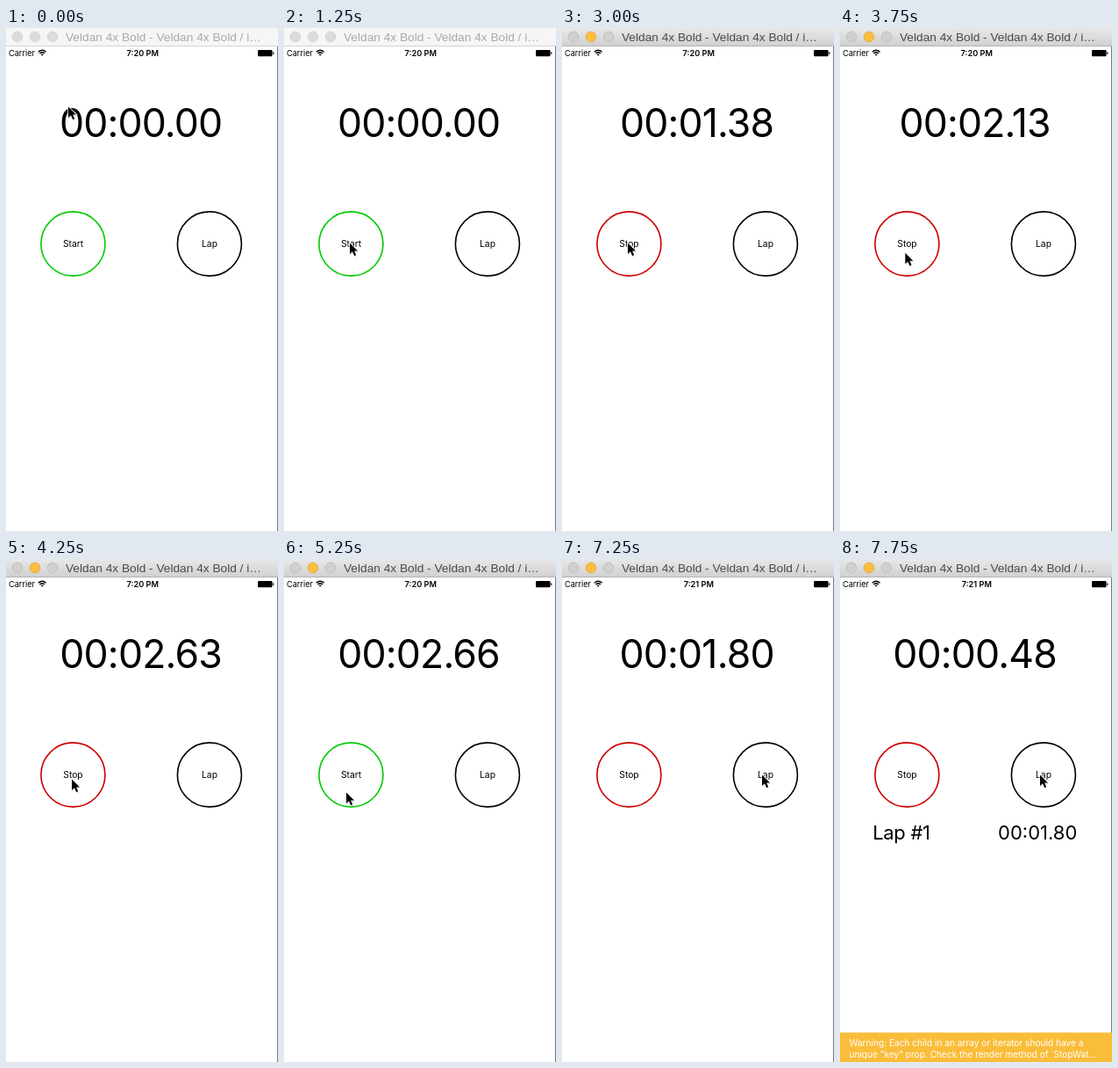
An HTML page that plays this animation: 310 by 572 pixels, repeating every 8000 ms.

```html
<!DOCTYPE html>
<html lang="en">
<head>
<meta charset="utf-8">
<title>Stopwatch</title>
<style>
  html, body { margin: 0; width: 100%; height: 100%; overflow: hidden; background: #fff; }
  svg { display: block; font-family: Inter, Roboto, sans-serif; }
  .mid { text-anchor: middle; }
  .title { font: 13.7px "Liberation Sans", Arial, sans-serif; }
  .status { font-size: 9.2px; }
  .label { font-size: 10.3px; }
  .clock { font-size: 44.5px; letter-spacing: -.8px; }
  .row { font-size: 22px; }
  .warning { font-size: 10.15px; fill: #fff; }
  .ring { fill: none; stroke: #000; stroke-width: 1.6; }
</style>
</head>
<body>
<svg width="310" height="572" viewBox="0 0 310 572">
  <defs>
    <linearGradient id="chrome" x2="0" y2="1">
      <stop stop-color="#e8e8e8"/>
      <stop offset="1" stop-color="#d1d1d1"/>
    </linearGradient>
  </defs>

  <rect id="bar" width="310" height="20"/>
  <rect id="barEdge" y="20" width="310" height="1"/>
  <g stroke-width=".8">
    <circle class="light" cx="13" cy="10" r="5.8"/>
    <circle class="light" cx="33" cy="10" r="5.8"/>
    <circle class="light" cx="53" cy="10" r="5.8"/>
  </g>
  <text id="title" class="title" x="68" y="15">Veldan 4x Bold - Veldan 4x Bold / i…</text>

  <text class="status" x="3" y="32">Carrier</text>
  <g fill="none" stroke="#000" stroke-width="1.4">
    <path d="M36.8 27.2Q41.2 23.2 45.6 27.2M38.5 29.1Q41.2 26.6 43.9 29.1"/>
    <path d="M39.7 30L41.2 31.8 42.7 30Q41.2 28.9 39.7 30Z" fill="#000" stroke="none"/>
  </g>
  <text id="time" class="status mid" x="155.8" y="32" font-weight="600"></text>
  <rect x="287" y="25" width="16.5" height="7.2" rx="1.2"/>
  <rect x="304.2" y="27.3" width="1.2" height="2.6" rx=".6"/>

  <text id="clock" class="clock mid" x="153.6" y="124"></text>
  <circle id="toggleRing" class="ring" cx="76.4" cy="245.4" r="36.5"/>
  <text id="toggle" class="label mid" x="76.5" y="249"></text>
  <circle class="ring" cx="231.9" cy="245.4" r="36.5"/>
  <text class="label mid" x="232" y="249">Lap</text>

  <rect x="309" y="21" width="1" height="551" fill="#777"/>
  <g id="lap">
    <text class="row mid" x="69.9" y="319" letter-spacing="-.3">Lap #1</text>
    <text class="row mid" x="225.2" y="319">00:01.80</text>
    <rect y="538.5" width="310" height="33.5" fill="#fabd3a"/>
    <text class="warning" x="10.4" y="554">Warning: Each child in an array or iterator should have a</text>
    <text class="warning" x="10.4" y="566.5">unique "key" prop. Check the render method of `StopWat…</text>
  </g>

  <g id="cursor">
    <g transform="translate(0 .4) scale(.9)">
      <path d="M0 0V14L3.3 11 5.6 16.3 8 15.3 5.7 10H10Z" transform="translate(.6 1.6)" opacity=".18"/>
      <path d="M0 0V14L3.3 11 5.6 16.3 8 15.3 5.7 10H10Z" stroke="#fff" stroke-width="1.6" paint-order="stroke"/>
    </g>
  </g>
</svg>
<script>
const LOOP = 8000, STEP = 250;
const ACTIVATE = 1500, START = 1608, STOP = 4290, RESTART = 5450, LAP = 7270;

// Pointer path: time, x, y
const path = [
  [0, 71, 89], [500, 84, 140], [1250, 75, 244], [3000, 75, 244], [3500, 74, 258],
  [4250, 75, 250], [5000, 71, 265], [5500, 71, 265], [6250, 112, 259],
  [7000, 228, 245], [LOOP, 228, 245]
];

const $ = id => document.getElementById(id);
const set = (node, attrs) => {
  for (const key in attrs) node.setAttribute(key, attrs[key]);
};
const pad = n => String(n).padStart(2, "0");

function pointerAt(t) {
  const i = path.findIndex(p => p[0] > t);
  const [t0, x0, y0] = path[i - 1], [t1, x1, y1] = path[i];
  const p = (t - t0) / (t1 - t0);
  return [x0 + (x1 - x0) * p, y0 + (y1 - y0) * p];
}

function elapsedAt(t) {
  if (t >= LAP) return t - LAP;
  if (t >= RESTART) return t - RESTART;
  if (t >= STOP) return 2660;
  return Math.max(0, (t - START) * 0.997);
}

function format(ms) {
  const cs = Math.floor(ms / 10);
  return `${pad(Math.floor(cs / 6000))}:${pad(Math.floor(cs / 100) % 60)}.${pad(cs % 100)}`;
}

function draw(t) {
  const active = t >= ACTIVATE;
  const running = t >= START && t < STOP || t >= RESTART;

  set($("bar"), { fill: active ? "url(#chrome)" : "#f6f6f6" });
  set($("barEdge"), { fill: active ? "#b4b4b4" : "#d4d4d4" });
  set($("title"), { fill: active ? "#4a4a4a" : "#a9a9a9" });
  document.querySelectorAll(".light").forEach((light, i) => {
    const yellow = active && i === 1;
    set(light, {
      fill: yellow ? "#fdbe40" : active ? "#d0d0d0" : "#dcdcdc",
      stroke: yellow ? "#e3a535" : active ? "#b9b9b9" : "#d0d0d0"
    });
  });

  $("time").textContent = t >= 7000 ? "7:21 PM" : "7:20 PM";
  $("clock").textContent = format(elapsedAt(t));
  $("toggle").textContent = running ? "Stop" : "Start";
  set($("toggleRing"), { style: `stroke:${running ? "#c00" : "#0c0"}` });
  set($("lap"), { visibility: t >= LAP ? "visible" : "hidden" });
  set($("cursor"), { transform: `translate(${pointerAt(t)})` });
}

const begin = performance.now();
function tick() {
  const t = (performance.now() - begin) % LOOP;
  draw(Math.floor(t / STEP) * STEP);
  requestAnimationFrame(tick);
}
tick();
</script>
</body>
</html>
```
